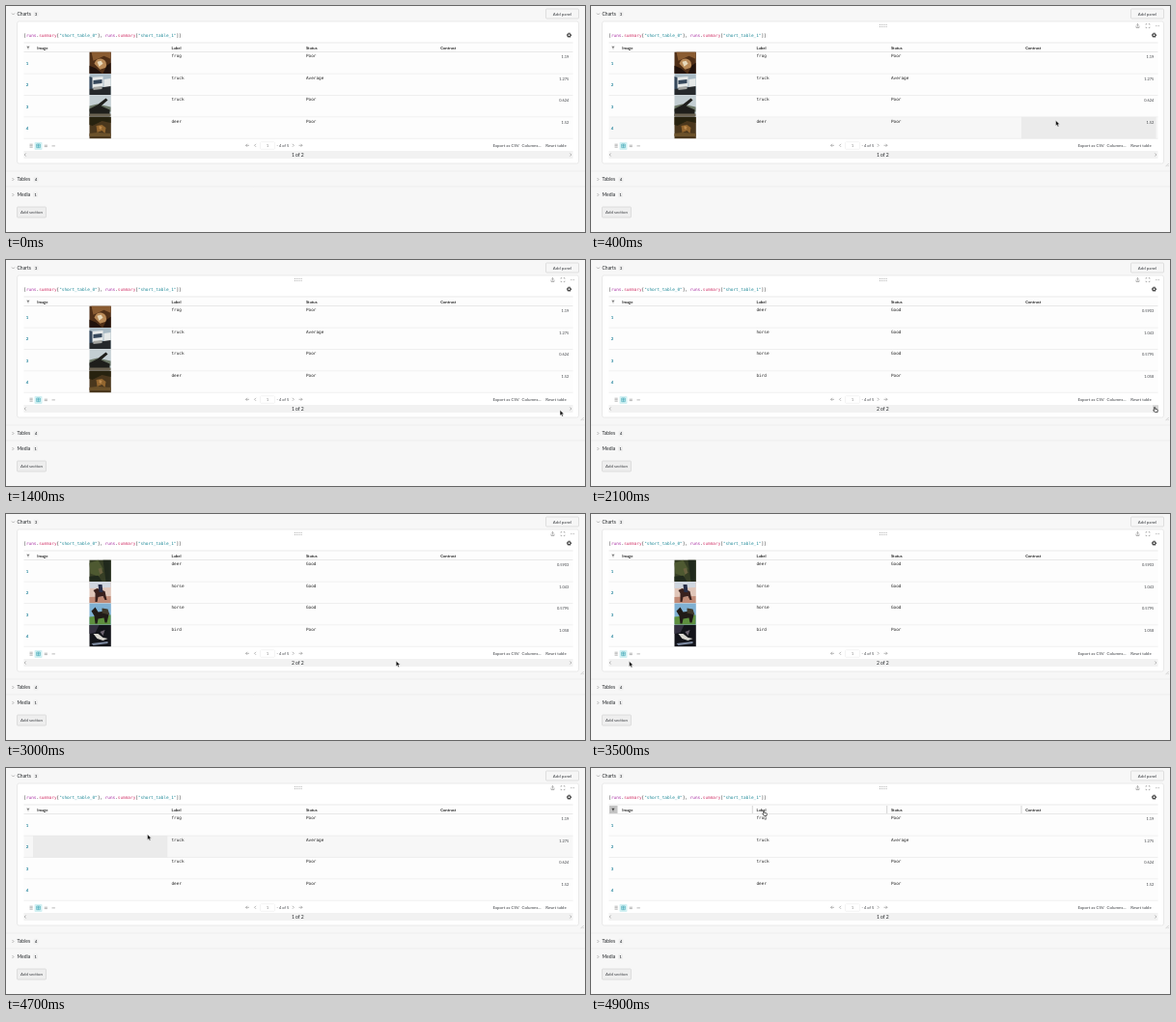
Recreate the animation shown at these times as an HTML page. Size 600 px wide and 234 px high, loop 5000 ms.

```html
<!DOCTYPE html>
<html lang="en">
<head>
<meta charset="utf-8">
<title>Table panel</title>
<style>
  html, body { margin: 0; width: 100%; height: 100%; overflow: hidden; background: #f7f7f7; }
  svg { display: block; width: 600px; height: 234px; }
  text { font: 4.4px Lato, sans-serif; fill: #3c3f43; white-space: pre; }
  .title { font-size: 5px; fill: #24272a; }
  .badge { font-size: 3.8px; font-weight: 700; text-anchor: middle; }
  .head { font-size: 4.2px; font-weight: 700; fill: #222; }
  .mono { font: 4.33px "DejaVu Sans Mono", monospace; fill: #222; }
  .num { font-size: 3.9px; text-anchor: end; }
  .row { font-size: 4.4px; font-weight: 700; fill: #1b7f98; text-anchor: middle; }
  .mid { text-anchor: middle; }
  .soft { fill: #888; }
  .line { fill: none; stroke: #888; stroke-width: .6; }
  .thin { fill: none; stroke: #999; stroke-width: .4; }
  .rule { fill: none; stroke: #e6e6e6; stroke-width: .6; }
  .button { fill: #f6f6f6; stroke: #cfcfcf; stroke-width: .6; }
</style>
</head>
<body>
<svg viewBox="0 0 600 234">
  <path class="rule" d="M0 171H600M0 187H600"/>
  <path class="line" d="M6 7.5l1.5 1.5 1.5-1.5M6.5 178l1.4 1.5-1.4 1.5M6.5 194l1.4 1.5-1.4 1.5"/>
  <g fill="#efefef">
    <rect x="28.5" y="5.5" width="5" height="5.6" rx="1"/>
    <rect x="28.5" y="176.8" width="5" height="5.6" rx="1"/>
    <rect x="28" y="192.6" width="5" height="5.6" rx="1"/>
  </g>
  <text class="title" x="11.5" y="10">Charts</text><text class="badge" x="31" y="9.7">3</text>
  <text class="title" x="11.5" y="181.3">Tables</text><text class="badge" x="31" y="181">4</text>
  <text class="title" x="11.5" y="197.1">Media</text><text class="badge" x="30.5" y="196.8">1</text>
  <rect class="button" x="559.5" y="3" width="34" height="10" rx="1"/>
  <text class="mid" x="576.5" y="9.7">Add panel</text>
  <rect class="button" x="11.5" y="208" width="30" height="11" rx="1" style="fill:#eee"/>
  <text class="mid" x="26.5" y="215.1">Add section</text>

  <rect x="11.5" y="16" width="582" height="147" rx="2" fill="#fff" stroke="#dedede" stroke-width=".6"/>
  <text class="mono" x="18.3" y="31.8" style="font-size:4.38px">[<tspan fill="#a62aa0">runs</tspan>.<tspan fill="#d2386c">summary</tspan>[<tspan fill="#1b8796">"short_table_0"</tspan>], <tspan fill="#a62aa0">runs</tspan>.<tspan fill="#d2386c">summary</tspan>[<tspan fill="#1b8796">"short_table_1"</tspan>]]</text>
  <circle cx="583.5" cy="30.2" r="1.5" fill="none" stroke="#333" stroke-width="1.1"/>
  <circle cx="583.5" cy="30.2" r="2.2" fill="none" stroke="#333" stroke-width=".9" stroke-dasharray=".85"/>
  <rect x="18.5" y="38" width="569" height="99.5" fill="#fdfdfd"/>
  <g id="table"></g>

  <rect x="29.5" y="141" width="8" height="8" rx="1" fill="#d3f1f3"/>
  <path class="line" d="M24.5 143.2h3.2m-3.2 1.5h3.2m-3.2 1.5h3.2M39.7 144.2h3.2m-3.2 1.4h3.2M47.5 144.9h3.4"/>
  <path class="line" style="stroke:#3fa6b5" d="M31.7 143h3.6v3.7h-3.6zM31.7 144.8h3.6M33.5 143v3.7"/>
  <path class="line" d="M252 144.3h-3.5m1.5-1.5l-1.5 1.5 1.5 1.5M259 142.8l-1.5 1.5 1.5 1.5M296.8 142.8l1.5 1.5-1.5 1.5M303.5 144.3h3.5m-1.5-1.5l1.5 1.5-1.5 1.5"/>
  <rect x="263.5" y="140.7" width="15" height="7.6" rx="1" fill="#fff" stroke="#e8e8e8" stroke-width=".5"/>
  <text class="mid soft" x="271" y="146">1</text>
  <text x="280.5" y="146" style="font-size:4px">- 4 of 5</text>
  <text x="504.4" y="146.4">Export as CSV</text>
  <text x="534.6" y="146.4">Columns...</text>
  <text x="559.3" y="146.4">Reset table</text>
  <rect x="18.5" y="150" width="569" height="8" fill="#f2f2f2"/>
  <g id="live"></g>
</svg>
<script>
const LOOP = 5000, STEP = 100;
const COLS = [28, 167.3, 306.7, 446, 585.5];
const TOP = 47.7, ROW = 22.4;
const PAGES = [
  [['frog', 'Poor', '1.19'], ['truck', 'Average', '1.275'], ['truck', 'Poor', '0.624'], ['deer', 'Poor', '1.52']],
  [['deer', 'Good', '0.5903'], ['horse', 'Good', '1.043'], ['horse', 'Good', '0.5795'], ['bird', 'Poor', '1.058']]
];

// Thumbnails on a 22 x 22 field: background, then colour and path pairs.
const THUMBS = [[
  ['#4f2f17', '#8a5c32', 'M2 0H22V7L15 4 4 9z', '#b98a58', 'M5 12Q7 6 13 7Q19 9 17 16L11 18z', '#e8d9bb', 'M8 10l4-1 2 3-4 3z', '#20120c', 'M0 14l7 3 6 5H0zM18 14l4-3v11h-8z'],
  ['#a9bac4', '#e6e9e8', 'M2 4L14 3V13L3 15zM15 6l7-1v9h-7z', '#35475a', 'M4 7l9-1v4l-9 1zM0 3l3 1v12H0z', '#25282b', 'M0 16l22-3v9H0z', '#a6a7a3', 'M4 14l9-1v3l-9 1z'],
  ['#c3ced2', '#6c7766', 'M0 11l8-2 14 3v5H0z', '#1e1e1b', 'M0 14L8 10l9-7 2 2-7 6 9 4v7H0z', '#6a6251', 'M0 19h22v3H0z'],
  ['#4a371d', '#27220f', 'M0 0h22v6L13 4 3 9 0 8z', '#93662f', 'M7 9l6-1 4 3-1 6-3-3-5 2z', '#bd8a4d', 'M10 9l3 1-1 3-2-1z', '#6b512a', 'M0 17l8-1 14 1v3H0z']
], [
  ['#363e25', '#4e5931', 'M0 3L9 0l5 9-4 8L1 14z', '#20291c', 'M14 0h8v22h-5zM0 17l9-1 4 6H0z', '#6a6240', 'M9 9l3-1 2 5-3 2z'],
  ['#dfc5b8', '#cfd6df', 'M0 0h22v6L0 7z', '#c08a76', 'M0 16l22-1v7H0z', '#39201d', 'M4 9l4-2 8 3 2 9h-2l-2-4-5 1-1 5H6V12z', '#272e48', 'M9 3h4l1 8h-4z'],
  ['#7fb0d2', '#5d8f3e', 'M0 14l22-2v10H0z', '#201a17', 'M2 8l4-4 3 5 8-1 3 4-2 8h-2l-1-5-6 1-1 5H6l-1-8z', '#403a2c', 'M13 5l6 1 2 6-8-2z'],
  ['#13141a', '#33303f', 'M0 0h10L6 8 0 9z', '#d9d7d0', 'M4 9l5 0 5 4 5 1-5 2-6-2z', '#6d6470', 'M11 7l5-2-2 6z', '#7d8aa0', 'M2 19l17-2v2L4 21z']
]];

// Pointer path: time, x, y.
const PATH = [
  [100, 425, 75], [600, 520, 150], [700, 534, 166], [800, 536, 171.5], [1000, 545, 172],
  [1200, 565, 160], [1600, 584, 154], [2800, 584, 154], [3400, 46, 153], [3500, 40, 154],
  [3900, 18, 154.5], [4400, 18, 154.5], [4700, 147, 70.3], [4900, 179, 46]
];

const text = (cls, x, y, s) => `<text class="${cls}" x="${x}" y="${y}">${s}</text>`;
const rect = (x, y, w, h, fill) => `<rect x="${x}" y="${y}" width="${w}" height="${h}" fill="${fill}"/>`;
const path = (d, attrs) => `<path d="${d}" ${attrs}/>`;
const LINE = 'class="line"', THIN = 'class="thin"';

function thumb([back, ...shapes], x, y) {
  let out = rect(0, 0, 22.3, 22.3, back);
  for (let i = 0; i < shapes.length; i += 2) out += path(shapes[i + 1], `fill="${shapes[i]}"`);
  return `<g transform="translate(${x} ${y})">${out}</g>`;
}

function dots(x, y) {
  let out = '';
  for (let i = 0; i < 8; i++) out += rect(x + i % 4 * 2.2, y + (i >> 2) * 2, .9, .9, '#999');
  return out;
}

function pointerAt(t) {
  const i = PATH.findIndex(p => p[0] >= t);
  if (t < PATH[0][0]) return null;
  if (i < 1) return PATH.at(i).slice(1);
  const [a, b] = [PATH[i - 1], PATH[i]];
  const k = (t - a[0]) / (b[0] - a[0]);
  return [1, 2].map(n => a[n] + (b[n] - a[n]) * k);
}

function drawTable(t, page, [x, y]) {
  const row = Math.floor((y - TOP) / ROW);
  const col = COLS.findIndex((c, i) => x >= c && x < COLS[i + 1]);
  const inHead = y > 38.5 && y < TOP && col >= 0;
  let out = '';
  if (row >= 0 && row < 4 && col >= 0) {
    out += rect(18.5, TOP + row * ROW, 569, ROW, '#f7f7f7');
    out += rect(COLS[col], TOP + row * ROW, COLS[col + 1] - COLS[col], ROW, '#ebebeb');
  }
  out += path('M18.5 38H587.5M18.5 47.5H587.5', 'class="rule" style="stroke:#dcdcdc"');
  if (inHead) {
    out += rect(19, 39, 8.5, 8, '#c4c4c4');
    out += path(COLS.slice(1, 4).map(c => `M${c} 39V47`).join(''), THIN);
  }
  out += path('M21.2 41.8h3.4l-1.3 1.5v1.4l-.8-.5v-.9z', `fill="${inHead ? '#333' : '#777'}"`);
  ['Image', 'Label', 'Status', 'Contrast'].forEach((s, i) => out += text('head', COLS[i] + 4.2, 44.8, s));

  PAGES[page].forEach(([label, status, value], i) => {
    const top = TOP + i * ROW;
    const loaded = page ? t >= (i < 2 ? 2500 : 2600) : t < 1900;
    out += path(`M18.5 ${top + ROW}H587.5`, 'class="rule"');
    out += text('row', 22, top + 13, i + 1);
    if (loaded) out += thumb(THUMBS[page][i], 86.5, top);
    out += text('mono', 171.5, top + 5.6, label) + text('mono', 311, top + 5.6, status);
    out += text('num', 583.3, top + 6.7, value);
  });
  return out;
}

function drawLive(page, [x, y], onArrow) {
  let out = '';
  if (onArrow) out += rect(x < 300 ? 16.5 : 582, 150.3, 6, 7.4, '#d5d5d5');
  out += path('M20.6 152.5l-1.4 1.5 1.4 1.5M584.4 152.5l1.4 1.5-1.4 1.5', LINE);
  out += `<text class="mid title" x="302.3" y="155.8">${page + 1} of 2</text>`;

  if (x > 11.5 && x < 593.5 && y > 16 && y < 163) {
    out += dots(299, 19);
    out += path('M565 20.5v2h3v-2M566.5 21.5v-3m-1 1l1-1 1 1M575 19.6v-1h1.2m1.6 0H579v1m0 2v1h-1.2m-1.6 0H575v-1M585 20.6h.9m.7 0h.9m.7 0h.9', LINE);
    out += path('M595.5 166.2l3.2-3.2M597.5 166.2l1.2-1.2', THIN);
  }
  if (y > 167 && y < 187) {
    const dark = 'fill="none" stroke="#444" stroke-width=".8"';
    out += dots(268, 177.6);
    out += path('M513 179.5h1m1 0h1m1 0h1M525 178l3 3m-2.6-.2l2.4-2.6M527 177.5l2 2M538 181.5h4M540 180.8v-3m-1.2 1.2l1.2-1.2 1.2 1.2M551.5 181.6v-1.6m1.8 1.6v-2.6m1.8 2.6v-4', dark);
    out += '<rect class="button" x="559.5" y="174.3" width="34" height="10.4" rx="1"/>';
    out += text('mid soft', 576.5, 181.1, 'Add panel');
  }
  return out;
}

// The drawn tip sits slightly above the point that hovers.
function drawPointer([x, y], hand) {
  const d = hand
    ? 'M0 0q.8-.7 1.2.2v1.9l2.6.5q.8.2.6 1L4 6H1L-1 3.6q.2-.8 1-.2z'
    : 'M0 0V5.6L1.3 4.4 2.2 6.4 3.2 6 2.3 4 4.1 3.9z';
  const look = hand ? 'fill="#eee" stroke="#222" stroke-width=".8"' : 'fill="#111" stroke="#fff" stroke-width=".4"';
  return path(d, `transform="translate(${x - .4} ${y - 1.5}) scale(${hand ? .85 : 1})" ${look}`);
}

const table = document.getElementById('table');
const live = document.getElementById('live');
let shown = -1;

function frame(now) {
  const t = Math.floor(now % LOOP / STEP) * STEP;
  if (t !== shown) {
    shown = t;
    const page = t >= 1900 && t < 4500 ? 1 : 0;
    const pointer = pointerAt(t);
    const at = pointer || [-99, -99];
    const onArrow = at[1] > 150 && at[1] < 158 && (at[0] > 581 || at[0] > 0 && at[0] < 23);
    const onHead = at[1] > 38.5 && at[1] < TOP;
    table.innerHTML = drawTable(t, page, at);
    live.innerHTML = drawLive(page, at, onArrow) + (pointer ? drawPointer(pointer, onArrow || onHead) : '');
  }
  requestAnimationFrame(frame);
}
requestAnimationFrame(frame);
</script>
</body>
</html>
```
